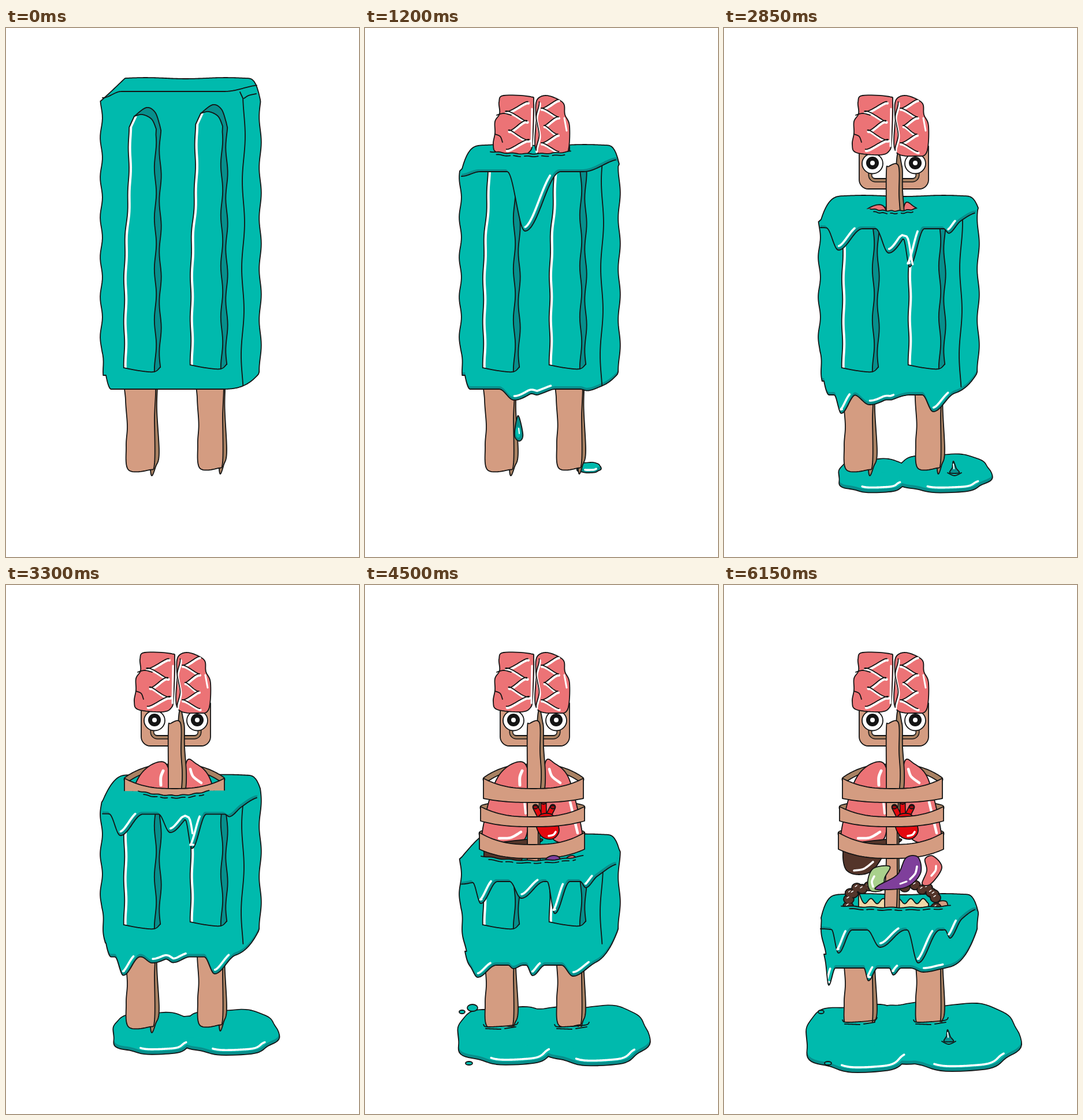
Animation of 611 by 917 pixels, one loop 6.3 s. Source, as an HTML page with a canvas:

```html
<!DOCTYPE html>
<html lang="en">
<head>
<meta charset="utf-8">
<title>Melting popsicle</title>
<style>
html, body { margin: 0; width: 100%; height: 100%; overflow: hidden; background: #fff; }
canvas { display: block; width: 611px; height: 917px; }
</style>
</head>
<body>
<canvas id="stage" width="611" height="917"></canvas>
<script>
const ctx = document.getElementById('stage').getContext('2d');
const { sin, cos, abs, sign, exp, hypot, max, min, floor, PI } = Math;
const W = 611, H = 917, STEP = 150, STEPS = 42, LINE = 1.8;
const INK = '#141414', TEAL = '#00baad', DEEP = '#078f8c', WOOD = '#d49c81', BARK = '#a98263',
  PINK = '#ec7376', RED = '#e3090f', BROWN = '#54352a', CREAM = '#f0d8a8';

// Smooth curve through flat x,y pairs
function curve(flat, closed) {
  const m = flat.length / 2, n = 100, out = [];
  const at = (i, c) => flat[2 * (closed ? (i + m) % m : max(0, min(m - 1, i))) + c];
  for (let s = 0; s < n; s++) {
    const u = closed ? s / n * m : s / (n - 1) * (m - 1);
    const i = min(floor(u), closed ? m : m - 2), f = u - i;
    out.push([0, 1].map(c => {
      const a = at(i - 1, c), b = at(i, c), d = at(i + 1, c), e = at(i + 2, c);
      return b + f / 2 * (d - a + f * (2 * a - 5 * b + 4 * d - e + f * (3 * (b - d) + e - a)));
    }));
  }
  return out;
}
const span = (a, b, n, point) => Array.from({ length: n + 1 }, (_, i) => point(a + (b - a) * i / n));

function trace(pts, closed, dx = 0, dy = 0) {
  ctx.beginPath();
  pts.forEach(([x, y]) => ctx.lineTo(x + dx, y + dy));
  if (closed) ctx.closePath();
}
function stroke(color = INK, width = LINE) {
  ctx.strokeStyle = color;
  ctx.lineWidth = width;
  ctx.stroke();
}
function fill(color) {
  ctx.fillStyle = color;
  ctx.fill();
}
function area(pts, color) {
  trace(pts, true);
  fill(color);
}
function line(flat, color, width) {
  trace(curve(flat));
  stroke(color, width);
}
function shape(flat, color) {
  area(curve(flat, true), color);
  stroke();
}
function disc(x, y, rx, ry, color, outlined) {
  ctx.beginPath();
  ctx.ellipse(x, y, rx, ry, 0, 0, 7);
  fill(color);
  if (outlined) stroke();
}
const shine = (flat, width = 3.6) => line(flat, '#fff', width);

// top: height, left drop, right drop, corner sharpness; cap: left, middle, right height
// runs: x, depth, width of each drip; left, right: puddle ellipses; water: x1, x2, level, dip
const poses = [];
const pose = (k, top, cap, capRuns, base, footRuns, left, right, water) =>
  poses.push({ k, top, cap, capRuns, base, footRuns, left, right, water });

pose(0, [87, 35, 36, 1], [121, 110, 99], [[198,0,30], [277,0,62], [325,0,30], [395,0,30]],
  626, [[200,0,25], [258,0,50], [295,0,30], [385,0,25]], [235,752,4,3], [351,752,5,3], [245,335,105,3]);
pose(8, [203, 40, 32, 3.5], [257, 249, 228], [[198,0,30], [277,103,62], [325,0,30], [395,0,30]],
  626, [[200,0,25], [258,19,52], [300,8,30], [385,3,25]], [235,752,4,3], [387,762,20,8], [217,356,218,4]);
pose(12, [223, 32, 18, 2.5], [268, 268, 237], [[190,4,30], [274,162,75], [322,22,30], [395,0,20]],
  627, [[200,0,25], [255,43,45], [292,8,20], [386,33,18]], [270,768,28,21], [394,767,50,17], [230,357,250,10]);
pose(19, [291, 40, 20, 3], [346, 348, 320], [[198,37,42], [285,42,45], [322,63,25], [390,10,20]],
  636, [[203,32,25], [252,17,55], [292,5,30], [362,29,38]], [260,776,62,28], [380,772,80,32], [253,333,317,4]);
pose(26, [381, 45, 25, 1], [464, 463, 432], [[198,37,36], [283,18,35], [322,54,25], [385,0,20]],
  656, [[203,32,35], [255,2,20], [287,16,28], [360,30,35]], [255,779,88,44], [395,780,85,46], [197,376,428,13]);
pose(34, [484, 30, 25, 1.5], [573, 565, 535], [[203,39,22], [258,40,46], [335,57,28], [380,22,20]],
  662, [[187,10,30], [258,10,15], [293,20,16], [360,8,45]], [245,784,93,53], [400,782,97,55], [205,379,527,3]);
pose(41, [536, 40, 30, 4], [596, 598, 562], [[198,40,24], [270,30,45], [336,57,38], [392,18,20]],
  664, [[181,30,12], [250,22,16], [293,12,14], [345,7,45]], [238,786,97,57], [402,784,107,57], [203,392,559,3]);

function mix(a, b, f) {
  if (typeof a === 'number') return a + (b - a) * f;
  if (Array.isArray(a)) return a.map((v, i) => mix(v, b[i], f));
  return Object.fromEntries(Object.keys(a).map(key => [key, mix(a[key], b[key], f)]));
}
function poseAt(k) {
  let i = 0;
  while (i < poses.length - 2 && k >= poses[i + 1].k) i++;
  const a = poses[i], b = poses[i + 1];
  return mix(a, b, (k - a.k) / (b.k - a.k));
}

const clamp = u => max(0, min(1, u));
const ease = u => (1 - cos(PI * clamp(u))) / 2;
// Drips hang steeply on their left and trail off to the right
const hang = (x, runs) => runs.reduce((sum, [c, depth, w]) =>
  sum + depth * (1 - ease(x < c ? (c - x) / (w / 2) : (x - c) / w)), 0);

const leftX = y => 165 + 1.9 * sin(y / 11) + max(0, y - 560) * .12;
const rightX = y => 440 + 1.8 * sin(y / 14);

const topEdge = ([y, dl, dr, p]) => span(168, 440, 100, x =>
  [x, y + dl * clamp((206 - x) / 38) ** p + dr * clamp((x - 418) / 22) ** 3 + sin(x / 22)]);
const capEdge = ([a, b, c], runs) => span(167, 434, 260, x =>
  [x, b + (a - b) * ease((200 - x) / 33) + (c - b) * ease((x - 378) / 66) * 1.03 + hang(x, runs)]);
const footEdge = (base, runs) => span(173, 437, 260, x =>
  [x, base - (base - 600) * clamp((x - 370) / 67) ** 3 - 24 * clamp((182 - x) / 9) ** 2 + hang(x, runs)]);

// White glints on the trailing side of the drips
function glints(pts, runs) {
  for (const [c, depth, w] of runs) {
    if (depth < 7) continue;
    ctx.beginPath();
    pts.forEach(([x, y], i) => {
      if (x < c || x > c + w * .8) return;
      const p = pts[max(0, i - 2)], q = pts[min(pts.length - 1, i + 2)];
      const dx = q[0] - p[0], dy = q[1] - p[1], len = hypot(dx, dy);
      ctx.lineTo(x + 7 * dy / len, y - 7 * dx / len);
    });
    stroke('#fff', 3.6);
  }
}
function rimmed(pts, depth) {
  ctx.save();
  trace(pts, true);
  ctx.clip();
  trace(pts, true, 0, -depth);
  fill(TEAL);
  ctx.restore();
}

const blob = ([cx, cy, rx, ry], a = 0, b = 2 * PI, inset = 0) => span(a, b, 90, t => {
  const r = 1 + .035 * sin(5 * t + 1) + .025 * sin(8 * t);
  const bend = v => sign(v) * abs(v) ** .8;
  return [cx + (rx * r - inset) * bend(cos(t)), cy + (ry * r - inset) * bend(sin(t))];
});
function puddle({ left, right }) {
  const pair = [left, right], joint = (left[3] - 20) * 1.4;
  const parts = pair.map(e => blob(e));
  if (joint > 3) parts.push(blob([(left[0] + right[0]) / 2, left[1] - 9, 62, joint]));
  parts.forEach(b => { trace(b, true); stroke(INK, LINE * 2); });
  parts.forEach(b => area(b, DEEP));
  parts.forEach(b => rimmed(b, 5));
  pair.forEach(e => {
    if (e[3] < 7) return;
    trace(blob(e, PI * .18, PI * .6, min(8, e[3] / 2)));
    stroke('#fff', 3.6);
  });
}

function leg(ox, oy, s) {
  const map = flat => flat.map((v, i) => i % 2 ? v + oy : ox + (v - 207) * s);
  shape(map([252,600, 262,600, 261,660, 265,735, 260,758, 250,765]), BARK);
  shape(map([208,600, 207,645, 210,690, 208,725, 212,766, 248,766, 257,755, 257,680, 255,600]), WOOD);
}
function legs(k) {
  const base = k < 23 ? 790 : k < 38 ? 766 : 758;
  ctx.save();
  ctx.beginPath();
  ctx.rect(0, 0, W, base);
  ctx.clip();
  leg(207, 0, 1);
  leg(331, -3, .88);
  ctx.restore();
  if (k < 23) return;
  for (const x of [205, 328]) {
    line([x, base - 4, x + 8, base, x + 52, base - 3, x + 60, base - 8]);
    line([x + 4, base + 3, x + 30, base + 4]);
    line([x + 37, base + 3, x + 56, base]);
  }
}

function groove() {
  const wob = y => 1.7 * sin(y / 14);
  const inner = curve([222,153, 236,150, 252,158, 260,175]).concat(span(185, 595, 60, y => [258.5 + wob(y), y]));
  const outer = curve([222,153, 243,138, 258,146, 266,168]).concat(span(178, 588, 60, y => [267 + wob(y + 30), y]));
  const edge = [[222, 153]].concat(span(172, 589, 60, y => [204.5 + 8 / (1 + exp((y - 335) / 26)) + sin(y / 12) * .8, y]));
  area([...outer, ...inner.slice().reverse()], DEEP);
  area([...edge, ...edge.map(([x, y]) => [x + 5, y]).reverse()], '#fff');
  [inner, outer, edge].forEach(e => { trace(e); stroke(); });
  line([204,589, 230,594, 256,596, 267,588]);
}

function body(p, k) {
  const top = topEdge(p.top), cap = capEdge(p.cap, p.capRuns), foot = footEdge(p.base, p.footRuns);
  const outline = [
    ...top,
    ...span(top[100][1] + 4, 596, 80, y => [rightX(y), y]),
    ...foot.slice().reverse(),
    ...span(foot[0][1], top[0][1] + 4, 80, y => [leftX(y), y])
  ];
  const depth = 5 * min(1, k / 8);
  area(outline, DEEP);
  rimmed(outline, depth);
  glints(foot, p.footRuns);

  ctx.save();
  trace(outline, true);
  ctx.clip();
  if (k < 32) {
    groove();
    ctx.translate(115, -5);
    groove();
    ctx.translate(-115, 5);
  }
  if (k < 38) {
    trace([[405, 111], ...span(122, 622, 70, y => [413 - y / 150 + 2.2 * sin(y / 24), y])]);
    stroke();
  }
  line([412,122, 420,117, 433,114]);
  trace([...top, ...cap.slice().reverse()], true);
  fill(DEEP);
  ctx.clip();
  const lifted = cap.map(([x, y]) => [x - depth * .5, y - depth * .8]);
  area([...lifted, [W, lifted[260][1]], [W, 0], [0, 0], [0, lifted[0][1]]], TEAL);
  ctx.restore();
  trace(cap);
  stroke();
  glints(cap, p.capRuns);
  trace(outline, true);
  stroke();
}

// A winding furrow running down the brain
function fold(x, y0, y1, amp, turns) {
  const pts = span(0, 1, 160, u => {
    const a = u * turns * 2 * PI;
    return [x + amp * cos(a) * (.85 + .15 * sin(u * 9)), y0 + (y1 - y0) * u - amp * .17 * sin(2 * a)];
  });
  trace(pts, false, 1, 2.6);
  stroke('#fff', 4.2);
  trace(pts);
  stroke();
}
function brain() {
  shape([240,117, 286,119, 292,130, 290,195, 286,213, 270,220, 229,216, 222,202, 225,182, 225,162, 233,148, 232,128], PINK);
  shape([304,119, 320,118, 343,130, 346,150, 354,170, 351,215, 333,222, 297,214, 296,160, 296,130], PINK);
  fold(264, 128, 210, 21, 2.5);
  fold(321, 124, 214, 16, 3);
  fold(299, 128, 212, 3, 1.5);
  line([228,151, 240,148, 253,151]);
  line([225,184, 234,188, 238,198]);
  shine([345,156, 349,178], 3);
  shine([289,140, 288,205], 3);
}
function eye(x, y) {
  disc(x, y, 18, 17.5, '#fff', true);
  disc(x, y - 1, 11, 11, INK);
  disc(x, y - 1, 4, 4, '#fff');
}
function head() {
  const hook = (x, y, w, b, r) => {
    ctx.moveTo(x, y);
    ctx.arcTo(x, b, x + w, b, r);
    ctx.arcTo(x + w, b, x + w, y, r);
    ctx.lineTo(x + w, y);
  };
  ctx.beginPath();
  hook(234, 205, 120, 279, 16);
  hook(252, 205, 84, 261, 10);
  ctx.fillStyle = WOOD;
  ctx.fill('evenodd');
  stroke();
  ctx.beginPath();
  hook(253, 248, 82, 264, 9);
  stroke(INK, 7);
  stroke(BARK, 4);
  eye(257, 235);
  eye(331, 235);
}
function spine() {
  shape([298,241, 308,240, 309,280, 312,342, 303,420, 303,568, 290,568], BARK);
  shape([281,250, 285,240, 302,239, 303,290, 305,335, 300,410, 298,568, 279,568, 281,470, 281,340], WOOD);
}
function lungs() {
  shape([275,308, 284,345, 280,432, 258,444, 210,444, 203,428, 222,350, 245,316], PINK);
  shape([312,308, 328,309, 354,338, 376,430, 368,446, 325,440, 308,380], PINK);
  shine([272,322, 268,333, 268,347], 5);
  shine([276,376, 278,396], 4);
  shine([232,439, 252,438, 270,428], 4.5);
  shine([319,319, 324,332, 338,343], 4.5);
  shine([355,376, 368,430], 4.5);
}
function heart() {
  for (const x of [295, 309, 325]) {
    const y = 385 - 8 * (x === 309), tx = 310 + (x - 310) / 2;
    line([x, y, tx, 400], INK, 11);
    line([x, y, tx, 400], RED, 7.5);
    disc(x, y, 4, 3, '#a10d12', true);
  }
  shape([296,415, 304,398, 325,399, 336,425, 325,440, 306,436], RED);
  shine([330,428, 326,433, 318,435]);
}
// left, right, height, top sag, band height, bottom sag, rise of the back
const ribs = [[205, 378, 335, 18, 35, 7, 22], [200, 380, 384, 18, 25, 10, 9], [198, 380, 429, 21, 29, 16, 9]];
const bow = (l, r, y, sag) => span(-1, 1, 40, u => [(l + r) / 2 + u * (r - l) / 2, y + sag * (1 - abs(u) ** 2.6)]);
function ribBack([l, r, y, , , , rise]) {
  trace(bow(l + 4, r - 4, y + 2, -rise));
  stroke(INK, 11);
  stroke(BARK, 7.5);
}
function ribFront([l, r, y, sag, h, low]) {
  area([...bow(l, r, y, sag), ...bow(l, r, y + h, low).reverse()], WOOD);
  stroke();
}
function guts() {
  shape([372,549, 385,549, 386,562, 370,562], WOOD);
  for (const [x, w] of [[233, 56], [302, 52]]) {
    const edge = span(0, w, 40, u => [x + u, 548 - 4.5 * cos(u / 3.4) - 14 * exp(-u / 3) * (x < 300)]);
    area([...edge, [x + w, 565], [x, 565]], CREAM);
    stroke();
  }
  const coil = span(0, 1, 15, u => {
    const a = PI * (1 - u);
    return [291 + 76 * sign(cos(a)) * abs(cos(a)) ** .55, 557 - 35 * sin(a) ** .6 + 3 * sin(u * 40)];
  });
  coil.forEach(([x, y]) => disc(x, y, 9, 8, BROWN, true));
  coil.forEach(([x, y]) => { disc(x, y, 7, 6, BROWN); shine([x - 3, y - 2, x, y - 4], 1.5); });
}
function belly() {
  shape([249,512, 259,491, 287,488, 278,508, 275,528, 254,530], '#a9d18c');
  shine([260,505, 256,514, 258,523]);
  shape([315,473, 336,472, 340,500, 315,524, 266,528, 267,521, 300,502], '#7f3f9b');
  shine([334,488, 331,500, 322,510]);
  shine([316,514, 305,518], 3);
  shape([348,475, 362,470, 377,490, 358,518, 343,518, 351,495], PINK);
  shine([367,487, 366,495, 359,504]);
}

function skeleton([x1, x2, level, dip]) {
  const rim = span(-1, 1, 40, u =>
    [(x1 + x2) / 2 + u * (x2 - x1) / 2, level - dip * u * u + sin(u * 18) * .7]);
  ctx.save();
  trace([[0, 0], [0, level - dip], ...rim, [W, level - dip], [W, 0]], true);
  ctx.clip();
  head();
  ribs.forEach(ribBack);
  lungs();
  shape([206,465, 211,493, 232,502, 258,494, 282,460, 305,440, 215,450], BROWN);
  shine([225,495, 242,492, 258,480]);
  guts();
  spine();
  heart();
  ribs.forEach(ribFront);
  belly();
  brain();
  ctx.restore();
  if (level < 118) return;
  trace(rim);
  stroke();
  ctx.setLineDash([24, 6, 12, 7]);
  trace(rim.slice(3, 38), false, 0, 4.5);
  stroke();
  ctx.setLineDash([]);
}

// x, y, moment, height
const drops = [[266, 694, 8, 44], [390, 706, 12, 27], [399, 706, 17, 27], [205, 725, 26, 31], [294, 735, 32, 26], [389, 735, 39, 26]];
const splashes = [[399, 765, 19], [294, 780, 34], [389, 785, 41]];
function drip(k) {
  for (const [x, mid, at, h] of drops) {
    if (abs(k - at) > 1) continue;
    const y = mid + (k - at) * 20, w = 2 + h * .12, b = y + h / 2;
    shape([x - 1, y - h / 2, x + w, b - h / 4, x + 1, b, x - w, b - h / 4], DEEP);
    disc(x - 1, y + h * .15, w * .6, h * .22, TEAL);
    shine([x, y, x + 1, y + h / 5], 2.2);
  }
  for (const [x, y, at] of splashes) {
    if (abs(k - at) > 1) continue;
    shape([x - 2, y - 14, x + 3, y - 2, x + 8, y + 6, x - 8, y + 6, x - 4, y - 3], DEEP);
    shine([x - 2, y - 9, x - 1, y - 1], 2);
    line([x - 12, y + 6, x, y + 11, x + 12, y + 6]);
  }
  if (k < 30) return;
  disc(168, 740, 5, 3, TEAL, true);
  disc(180, 829, 6, 3, TEAL, true);
  if (k < 38) disc(186, 733, 9, 6, TEAL, true);
}

function draw(k) {
  const p = poseAt(k);
  ctx.fillStyle = '#fff';
  ctx.fillRect(0, 0, W, H);
  ctx.lineJoin = ctx.lineCap = 'round';
  puddle(p);
  legs(k);
  body(p, k);
  drip(k);
  skeleton(p.water);
}

let shown = -1;
const start = performance.now();
function tick() {
  const k = floor((performance.now() - start) / STEP) % STEPS;
  if (k !== shown) draw(shown = k);
  requestAnimationFrame(tick);
}
tick();
</script>
</body>
</html>
```
